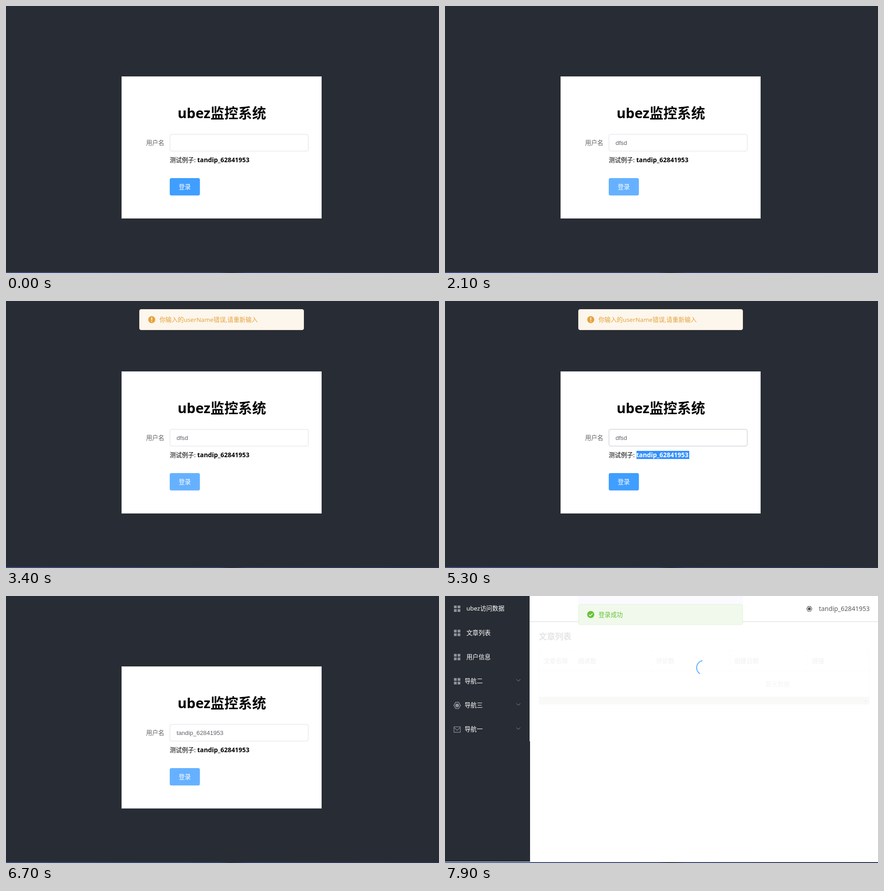
These frames come from a looping animation (952x588 px, 8 s). An HTML page:

```html
<!DOCTYPE html>
<html lang="zh-CN">
<head>
<meta charset="utf-8">
<title>监控系统登录</title>
<style>
  html, body { margin: 0; width: 100%; height: 100%; overflow: hidden; background: #282c34; }
  svg { display: block; width: 952px; height: 588px; }
  text { font: 13.37px "Noto Sans", "Noto Sans CJK SC", "Noto Sans CJK", sans-serif; white-space: pre; }
  .title { font-size: 30.6px; font-weight: 700; text-anchor: middle; }
  .typed { font: 13.33px "Liberation Sans", Arial, sans-serif; fill: #606266; }
  .user { font-size: 13.9px; font-weight: 700; }
  .mid { text-anchor: middle; }
  .white { fill: #fff; }
  .grey { fill: #909399; }
  .line { fill: none; stroke: #909399; }
  .head { font-weight: 700; fill: #909399; }
</style>
</head>
<body>
<svg viewBox="0 0 952 588" xmlns="http://www.w3.org/2000/svg">
  <defs>
    <linearGradient id="edge">
      <stop offset="0" stop-color="#3b4f88"/>
      <stop offset=".49" stop-color="#34446f"/>
      <stop offset=".52" stop-color="#2a2f42"/>
      <stop offset=".56" stop-color="#304070"/>
      <stop offset="1" stop-color="#2b3350"/>
    </linearGradient>
    <linearGradient id="key" x2="0" y2="1">
      <stop offset="0" stop-color="#454545"/>
      <stop offset="1" stop-color="#252525"/>
    </linearGradient>
  </defs>

  <rect width="952" height="588" fill="#282c34"/>

  <g id="form">
    <rect x="254.5" y="155.5" width="439" height="312" fill="#fff" stroke="#eaeaea"/>
    <text class="title" x="474.5" y="246.5">ubez监控系统</text>
    <text x="308" y="306" fill="#606266">用户名</text>
    <rect id="input" x="360.5" y="282.5" width="304" height="37" rx="3.5" fill="#fff" stroke="#dcdfe6"/>
    <rect id="picked" x="375" y="293" width="25.5" height="16" fill="#3390ff"/>
    <g id="values"></g>
    <text id="pickedText" class="typed" x="375" y="305.5" style="fill:#fff">dfsd</text>
    <rect id="caret" x="375" y="293" width="1" height="16" fill="#333"/>
    <text x="360" y="344">测试例子:</text>
    <text class="user" x="420.5" y="344">tandip_62841953</text>
    <g id="marked">
      <rect x="421" y="330" width="116" height="18" fill="#3390ff"/>
      <text class="user white" x="420.5" y="344">tandip_62841953</text>
    </g>
    <rect id="button" x="360" y="379" width="66.3" height="38.3" rx="3.8" fill="#409eff"/>
    <text class="mid white" x="393" y="403">登录</text>
  </g>

  <g id="ime">
    <rect x="915" y="165" width="60" height="50" rx="7" fill="#24262a"/>
    <rect x="919" y="166" width="60" height="44" rx="6" fill="#0b0c0d"/>
    <rect x="923.5" y="166.5" width="60" height="41" rx="5" fill="url(#key)" stroke="#3d4444"/>
    <path d="M923.5 172V202Q923.5 207.5 929 207.5H952" fill="none" stroke="#177a78"/>
    <text x="936" y="192.5" fill="#1cbcb8" style="font-size:17.5px">英</text>
  </g>

  <g id="warn">
    <rect x="293.5" y="18.5" width="361" height="45" rx="3.5" fill="#fdf6ec" stroke="#faecd8"/>
    <circle cx="320.4" cy="41" r="7.8" fill="#e6a23c"/>
    <path d="M320.4 36.6V41.6M320.4 44.6V45" stroke="#fff" stroke-width="1.9" stroke-linecap="round"/>
    <text x="337.5" y="45.7" fill="#e6a23c">你输入的userName错误,请重新输入</text>
  </g>

  <g id="page">
    <rect width="952" height="586" fill="#fff"/>
    <rect x="293" width="362" height="18" fill="#fafaff"/>
    <path d="M0 0H186V320H187V585H0z" fill="#282c34"/>
    <g id="menu"></g>
    <path d="M187 56.5H952" stroke="#d8d8d8"/>
    <use href="#cog" x="801" y="28.3" transform="translate(801 28.3) scale(.8) translate(-801 -28.3)" color="#50545a"/>
    <text x="822" y="33.3" fill="#5a5c61" style="font-size:13.9px">tandip_62841953</text>
    <text x="206" y="95.7" style="font-size:18px;font-weight:700">文章列表</text>
    <path d="M206.5 119.5H932.5V238.5H206.5zM206 165.5H933M282.5 119V165M454.5 119V165M626.5 119V165M797.5 119V165"
          fill="none" stroke="#dfe3ec"/>
    <g id="heads"></g>
    <text class="mid grey" x="731.5" y="199">暂无数据</text>
    <rect x="206" y="222" width="727" height="17" fill="#c1c1b8"/>
    <path d="M923.5 228L927 231L923.5 234z" fill="#505050"/>
    <rect id="mask" x="187" y="57" width="765" height="529" fill="#fff"/>
    <g id="spin" style="transform-origin:569.3px 158px">
      <circle id="arc" cx="569.3" cy="158" r="16" fill="none" stroke="#409eff" stroke-width="1.7" stroke-linecap="round"/>
    </g>
  </g>

  <g id="done">
    <rect x="293.5" y="18.5" width="361" height="45" rx="3.5" fill="#f0f9eb" stroke="#e1f3d8"/>
    <circle cx="320.4" cy="41" r="7.8" fill="#67c23a"/>
    <path d="M316.6 41.2L319.4 44L324.4 38.6" fill="none" stroke="#fff" stroke-width="1.6"/>
    <text x="337.5" y="45.7" fill="#67c23a" font-weight="500">登录成功</text>
  </g>

  <rect y="586" width="952" height="2" fill="url(#edge)"/>

  <defs>
    <g id="grid" fill="#909399">
      <path d="M-7-7h6v6h-6zM1-7h6v6h-6zM-7 1h6v6h-6zM1 1h6v6h-6z"/>
    </g>
    <g id="cog">
      <path d="M-3.4-6.8H3.4L7.2 0L3.4 6.8H-3.4L-7.2 0z" fill="none" stroke="currentColor" stroke-width="1.5" stroke-linejoin="round"/>
      <circle r="4" fill="currentColor"/>
    </g>
    <g id="mail" class="line" stroke-width="1.2">
      <path d="M-7-6H7V6H-7zM-7-4.5L0 1.5L7-4.5"/>
    </g>
  </defs>
</svg>

<script>
const LOOP = 8000;
const $ = id => document.getElementById(id);

// Side menu and table heads
$('menu').innerHTML = [
  ['grid', 'ubez访问数据'], ['grid', '文章列表'], ['grid', '用户信息'],
  ['grid', '导航二', 1], ['cog', '导航三', 1], ['mail', '导航一', 1]
].map(([icon, label, sub], i) => {
  const y = 27.7 + i * 53.2;
  return `<use href="#${icon}" x="26.7" y="${y + .4}" color="#909399"/>` +
    `<text class="white" x="${sub ? 43 : 47}" y="${y + 4.6}">${label}</text>` +
    (sub ? `<path class="line" d="M157 ${y - 4}l4.3 4.3l4.3-4.3"/>` : '');
}).join('');

$('heads').innerHTML = [
  [217, '文章名称'], [292.5, '阅读数'], [464, '评论数'], [636, '创建日期'], [807, '链接']
].map(([x, s]) => `<text class="head" x="${x}" y="147.5">${s}</text>`).join('');

const play = (el, frames) => el.animate(frames, { duration: LOOP, iterations: Infinity });

// Steps are [time, value, ramp]; without a ramp the change is hard
function track(el, prop, start, steps) {
  const frames = [];
  let now = start;
  const key = (t, easing) => frames.push({ offset: t / LOOP, [prop]: now, easing });
  key(0, 'steps(1, end)');
  for (const [t, value, ramp] of steps) {
    if (ramp) key(t, 'ease');
    now = value;
    key(t + (ramp || 0), 'steps(1, end)');
  }
  key(LOOP, 'linear');
  play(el, frames);
}

const show = (el, ...spans) =>
  track(el, 'opacity', 0, spans.flatMap(([a, b]) => b < LOOP ? [[a, 1], [b, 0]] : [[a, 1]]));

function message(el, enter, leave) {
  const up = 'translateY(-46px)', rest = 'translateY(0px)';
  const fade = [[enter, 1, 300]], slide = [[enter, rest, 400]];
  if (leave) {
    fade.push([leave, 0, 300]);
    slide.push([leave, up, 400]);
  }
  track(el, 'opacity', 0, fade);
  track(el, 'transform', up, slide);
}

// Input field
const IDLE = '#dcdfe6', HOVER = '#c0c4cc', FOCUS = '#409eff';
track($('input'), 'stroke', IDLE, [
  [800, HOVER], [960, FOCUS, 140], [1960, IDLE, 140],
  [3900, HOVER], [4300, IDLE], [5300, HOVER], [5460, FOCUS, 140], [6560, IDLE, 140]
]);

[
  ['d', [1100, 1200]], ['df', [1200, 1400]], ['dfsd', [1400, 6300]], ['tandip_62841953', [6300, LOOP]]
].forEach(([s, span]) => {
  const el = document.createElementNS('http://www.w3.org/2000/svg', 'text');
  el.setAttribute('class', 'typed');
  el.setAttribute('x', 375);
  el.setAttribute('y', 305.5);
  el.textContent = s;
  $('values').append(el);
  show(el, span);
});

show($('caret'), [1000, 2000], [5500, 5700], [6300, 6600]);
track($('caret'), 'transform', 'translateX(0px)',
  [[1100, 7], [1200, 11], [1400, 25], [6300, 103]].map(([t, x]) => [t, `translateX(${x}px)`]));
show($('picked'), [5700, 6300]);
show($('pickedText'), [5700, 6300]);
show($('marked'), [4500, 5500]);
show($('ime'), [1100, 2000], [5500, 6600]);

// Button
const BLUE = '#409eff', LIGHT = '#66b1ff', DOWN = '#3a8ee6';
track($('button'), 'fill', BLUE, [
  [1760, LIGHT, 100], [2000, DOWN], [2100, LIGHT],
  [4450, BLUE, 100], [6350, LIGHT, 100], [6600, DOWN], [6700, LIGHT]
]);

message($('warn'), 2934, 5590);
message($('done'), 7534);

// Signed-in page with its loader
show($('page'), [7600, LOOP]);
track($('mask'), 'opacity', 0, [[7560, .9, 300]]);

const SPIN = 7525;
const ticks = [0, 95, 190, 285, 380, 475];
const lead = (a, rest) => [{ offset: 0, ...a }, ...rest, { offset: 1, ...rest.at(-1), offset: 1 }];
play($('spin'), lead({ transform: 'rotate(0deg)' }, ticks.map(d =>
  ({ offset: (SPIN + d) / LOOP, transform: `rotate(${d * .18}deg)` }))));
play($('arc'), lead({ strokeDasharray: '0.8 160', strokeDashoffset: '0' }, ticks.map(d => {
  const p = d / 750, e = p * p * (3 - 2 * p);
  return {
    offset: (SPIN + d) / LOOP,
    strokeDasharray: `${.8 + 71.2 * e} ${160 - 40 * e}`,
    strokeDashoffset: `${-32 * e}`
  };
})));
</script>
</body>
</html>
```
